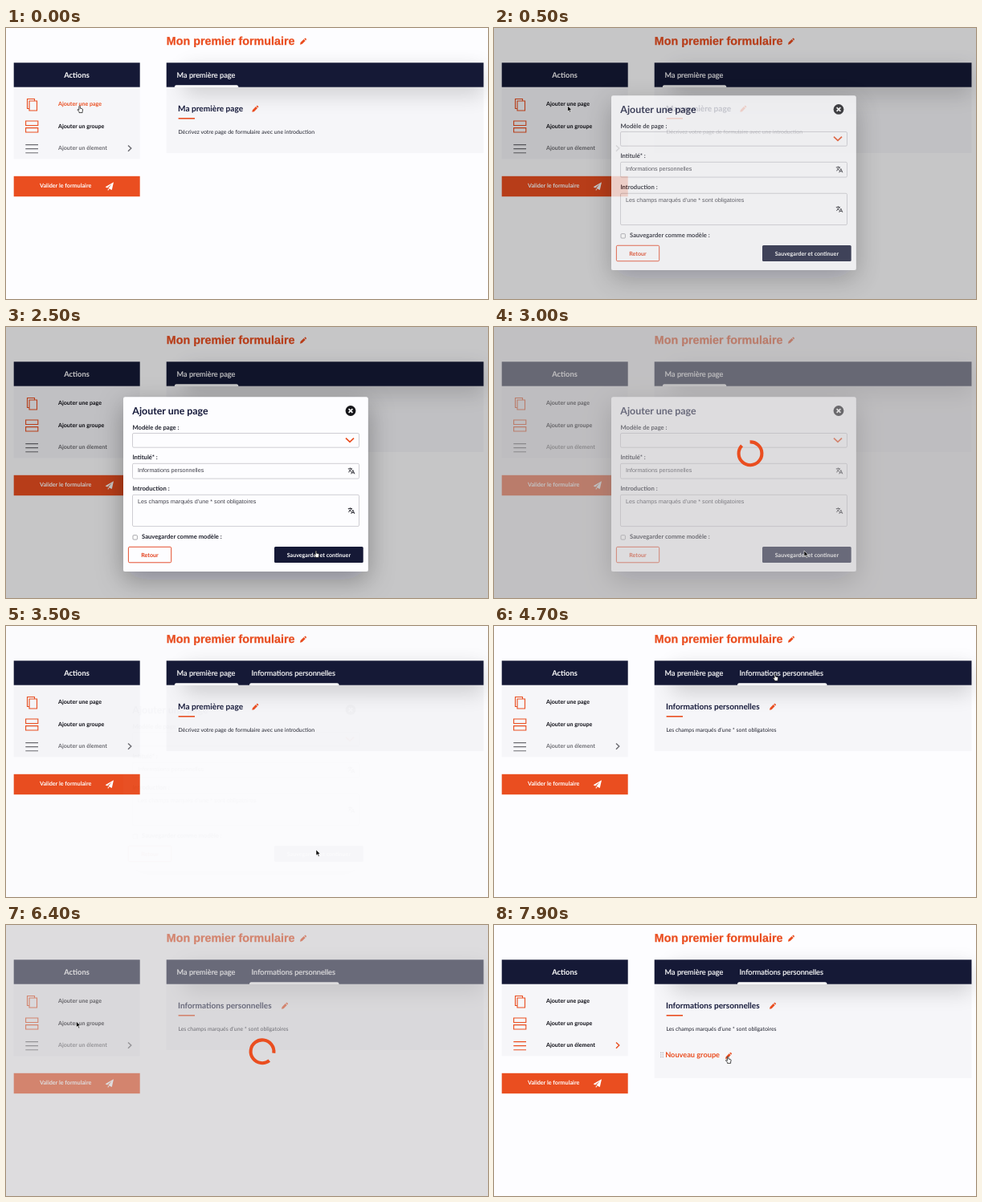
Recreate the animation shown at these times as an HTML page. Size 600x338 px, loop 8000 ms.

```html
<!DOCTYPE html>
<html lang="fr">
<head>
<meta charset="utf-8">
<title>Formulaire</title>
<style>
  html, body { margin: 0; width: 100%; height: 100%; overflow: hidden; background: #fdfdff; }
  svg { display: block; width: 600px; height: 338px; }
  text { font-family: Lato, sans-serif; fill: #15193a; white-space: pre; text-rendering: geometricPrecision; }
  .b { font-weight: 700; }
  .sans { font-family: "Liberation Sans", Arial, sans-serif; }
  .item { font-size: 7.1px; font-weight: 700; fill: #0c0c14; }
  .tab { font-size: 9.2px; fill: #fff; stroke: #fff; stroke-width: .2; }
  .label { font-size: 7.65px; font-weight: 700; fill: #20222e; }
  .input { font-size: 7.2px; fill: #40404a; }
  .box { fill: #fdfdff; stroke: #c3c2c8; stroke-width: .8; }
  .line { fill: none; stroke: #ea4e20; stroke-width: 1.1; }
  .navy { fill: #151936; }
  .orange { fill: #ea4e20; }
  .panel { fill: #f6f6f9; }
</style>
</head>
<body>
<svg viewBox="0 0 600 338" xmlns="http://www.w3.org/2000/svg">
  <defs>
    <filter id="blur" x="-30%" y="-250%" width="160%" height="600%"><feGaussianBlur stdDeviation="13"/></filter>
    <filter id="shadow" x="-30%" y="-35%" width="160%" height="180%">
      <feDropShadow dx="0" dy="10" stdDeviation="16" flood-color="#0a0820" flood-opacity=".32"/>
    </filter>
    <g id="pencil">
      <path class="orange" d="M0 8 L.6 5.4 L4.7 1.3 L6.7 3.3 L2.6 7.4 Z M5.3 .7 L6 0 Q6.6 -.3 7.1 .2 L7.8 .9 Q8.2 1.4 7.8 2 L7.2 2.7 Z"/>
    </g>
    <g id="translate" fill="none" stroke="#22222a" stroke-width=".9">
      <path d="M0 1.5 H5.2 M2.6 .2 V1.5 M4.4 1.5 Q3.6 4.2 .4 5.8 M1.2 2.6 Q2.2 4.4 3.8 5.2"/>
      <path d="M3.9 8 L6 3.2 L8.1 8 M4.7 6.5 H7.3"/>
    </g>
  </defs>

  <rect width="600" height="338" fill="#fdfdff"/>
  <text class="sans b" x="199.8" y="21" font-size="14.3" style="fill:#ea4e20;stroke:#ea4e20;stroke-width:.25">Mon premier formulaire</text>
  <use href="#pencil" x="366" y="12.7"/>

  <rect class="panel" x="9.7" y="73" width="157" height="90.4"/>
  <rect class="navy" x="9.7" y="43.3" width="157" height="30.4"/>
  <text class="b" x="88" y="62" font-size="9.4" text-anchor="middle" style="fill:#fff">Actions</text>
  <path class="line" d="M28.7 100.5 H26.5 V88.5 H35.5 V91 M29 91 H38.5 V103 H29 Z"/>
  <path class="line" d="M24.6 116 H39.8 V121.5 H24.6 Z M24.6 124.6 H39.8 V130 H24.6 Z"/>
  <path id="menuIcon" class="line" d="M24.3 145.6 H40 M24.3 150.6 H40 M24.3 155.8 H40"/>
  <path id="menuArrow" class="line" style="stroke-width:1.4" d="M152 146.4 L155.8 150.1 L152 153.8"/>
  <text id="addPage" class="item" x="65" y="97">Ajouter une page</text>
  <text id="addGroup" class="item" x="65" y="124.6">Ajouter un groupe</text>
  <text id="addItem" class="item" x="65" y="152.2">Ajouter un élement</text>
  <rect class="orange" x="9.7" y="184.8" width="157" height="25.4"/>
  <text class="b" x="42" y="199.2" font-size="7.2" style="fill:#fff">Valider le formulaire</text>
  <path fill="#fff" d="M134 192.2 L123.6 198.3 L126 199.4 L131.8 194.6 L127.3 200 L131.8 202 Z M126.8 200.5 L128.4 201.2 L126.8 203 Z"/>

  <rect id="formPanel" class="panel" x="199.7" y="73" width="394.8"/>
  <rect x="222" y="50" width="372" height="34" fill="#000" opacity=".15" filter="url(#blur)"/>
  <rect class="navy" x="199.7" y="43.3" width="394.8" height="30.4"/>
  <text class="tab" x="212.6" y="62.3">Ma première page</text>
  <path id="mark1" fill="#fff" d="M209.8 74 Q209.8 71.3 212 71.3 H287 Q289.3 71.3 289.3 74 Z"/>
  <g id="tab2">
    <text class="tab" x="305.6" y="62.3">Informations personnelles</text>
    <path fill="#fff" d="M303 74 Q303 71.3 305.2 71.3 H412.2 Q414.5 71.3 414.5 74 Z"/>
  </g>
  <text id="heading" class="b" x="214" y="104.3" font-size="10.1"></text>
  <use id="headPencil" href="#pencil" y="96.8"/>
  <rect class="orange" x="214.6" y="112" width="20.4" height="1.6"/>
  <text id="intro" x="214.4" y="132.2" font-size="6.9" style="fill:#20222e"></text>
  <g id="group">
    <g id="grip" fill="#b3b3ba"></g>
    <text class="b" x="213.2" y="165.3" font-size="9.2" style="fill:#ea4e20">Nouveau groupe</text>
    <use href="#pencil" x="288" y="159"/>
  </g>

  <rect id="backdrop" width="600" height="338"/>
  <g id="modal">
    <rect x="146" y="87.3" width="304.8" height="217.7" rx="2.5" fill="#fdfdff" filter="url(#shadow)"/>
    <text class="b" x="157.3" y="108.8" font-size="12.4">Ajouter une page</text>
    <circle cx="429" cy="104.5" r="6.4" fill="#17171b"/>
    <path d="M426.6 102.1 l4.8 4.8 m0 -4.8 l-4.8 4.8" stroke="#fff" stroke-width="1.7"/>
    <text class="label" x="157.4" y="127.6">Modèle de page :</text>
    <rect class="box" x="157.5" y="132.5" width="282" height="17.7" rx="1.5"/>
    <path class="line" style="stroke-width:1.7" d="M423 138.6 L428 143.4 L433 138.6"/>
    <text class="label" x="157.4" y="165">Intitulé* :</text>
    <rect class="box" x="157.5" y="170.3" width="282" height="18.8" rx="1.5"/>
    <text class="input sans" x="164" y="181.3">Informations personnelles</text>
    <use href="#translate" x="425.8" y="175.3"/>
    <text class="label" x="157.4" y="204.4">Introduction :</text>
    <rect class="box" x="157.5" y="209.3" width="282" height="39.3" rx="1.5"/>
    <text class="input sans" x="164" y="220.4">Les champs marqués d’une * sont obligatoires</text>
    <use href="#translate" x="425.8" y="225"/>
    <rect x="158" y="259.7" width="5.4" height="5.4" rx="1" fill="#fff" stroke="#85858c" stroke-width=".7"/>
    <text class="label" x="169" y="264.4">Sauvegarder comme modèle :</text>
    <rect x="152.4" y="274.3" width="53.3" height="19.5" rx="1.5" fill="#fdfdff" stroke="#e23c17" stroke-width=".9"/>
    <text class="b" x="179" y="286.6" font-size="7.1" text-anchor="middle" style="fill:#e23c17">Retour</text>
    <rect class="navy" x="334" y="274" width="110.7" height="20" rx="1.5"/>
    <text class="b" x="389.4" y="286.6" font-size="7.1" text-anchor="middle" style="fill:#fff">Sauvegarder et continuer</text>
  </g>

  <g id="loader">
    <rect width="600" height="338" fill="#bebcbe" opacity=".5"/>
    <circle id="ring" cx="319" cy="157.8" r="14.4" fill="none" stroke="#ea4e20" stroke-width="4.1" pathLength="360" stroke-dasharray="315 45"/>
  </g>

  <g id="cursor" stroke-linejoin="round">
    <path id="arrow" fill="#000" stroke="#fff" stroke-width=".6" d="M0 0 V7.2 L1.7 5.7 L2.9 8.6 L4.1 8.1 L2.9 5.3 H5.1 Z"/>
    <path id="hand" fill="#fff" stroke="#111" stroke-width=".75" d="M-.8 .6 Q0 -.5 .7 .6 V3.2 L3.2 3.8 Q4 4.1 3.9 5 L3.4 7.2 V8.6 H-.7 V7.6 L-2.6 5.3 Q-2.8 4.3 -1.8 4.5 L-.8 5.4 Z"/>
  </g>
</svg>
<script>
const LOOP = 8000, ORANGE = '#ea4e20', GREY = '#6c6c72', BLACK = '#0c0c14';
const PAGE_ADDED = 3220, TAB_OPENED = 4500, GROUP_ADDED = 6420;

const $ = id => document.getElementById(id);
const set = (id, attrs) => { for (const k in attrs) $(id).setAttribute(k, attrs[k]); };
const show = (id, on) => { $(id).style.display = on ? '' : 'none'; };
const ramp = (t, a, b) => Math.min(1, Math.max(0, (t - a) / (b - a)));
const smooth = p => p * p * (3 - 2 * p);
const within = (t, spans) => spans.some(([a, b]) => t >= a && t < b);
// Fades in over a..b and out over c..d.
const fade = (t, a, b, c, d) => ramp(t, a, b) * (1 - ramp(t, c, d));

// start time, end time, destination
const moves = [
  [900, 1790, 386, 279],
  [3700, 4250, 358, 58],
  [4620, 5400, 87.6, 120.3],
  [6900, 7700, 291.2, 163.8]
];
const handTimes = [[0, 300], [1720, 2800], [4180, 4720], [5220, 6100], [7600, LOOP]];

function cursorAt(t) {
  let x = 91.7, y = 97;
  for (const [a, b, toX, toY] of moves) {
    const p = smooth(ramp(t, a, b));
    x += (toX - x) * p;
    y += (toY - y) * p;
  }
  return [x, y];
}

for (let i = 0; i < 6; i++) {
  const dot = document.createElementNS('http://www.w3.org/2000/svg', 'circle');
  dot.setAttribute('cx', 207.8 + (i % 2) * 2.5);
  dot.setAttribute('cy', 159.4 + (i >> 1) * 2.6);
  dot.setAttribute('r', .8);
  $('grip').append(dot);
}

function render(t) {
  const second = t >= TAB_OPENED, grouped = t >= GROUP_ADDED;
  $('heading').textContent = second ? 'Informations personnelles' : 'Ma première page';
  $('intro').textContent = second
    ? 'Les champs marqués d’une * sont obligatoires'
    : 'Décrivez votre page de formulaire avec une introduction';
  set('headPencil', { x: second ? 343 : 306.3 });
  show('mark1', !second);
  show('tab2', t >= PAGE_ADDED);
  show('group', grouped);
  set('formPanel', { height: grouped ? 118 : 83 });

  $('addPage').style.fill = t < 300 ? ORANGE : BLACK;
  $('addGroup').style.fill = within(t, [[5220, 6100]]) ? ORANGE : BLACK;
  $('addItem').style.fill = grouped ? BLACK : GREY;
  for (const id of ['menuIcon', 'menuArrow']) $(id).style.stroke = grouped ? ORANGE : GREY;

  const modal = fade(t, 350, 550, 3250, 3505);
  const drop = 1 - ramp(t, 330, 650);
  set('backdrop', { opacity: .22 * fade(t, 250, 480, 3250, 3510) });
  set('modal', { opacity: modal, transform: `translate(0 ${-14 * drop * drop})` });
  show('modal', modal > 0);

  const loading = Math.max(fade(t, 2780, 2920, 3200, 3380), fade(t, 6080, 6220, 6400, 6580));
  set('loader', { opacity: loading });
  show('loader', loading > 0);
  set('ring', { transform: `rotate(${(t - 3000) * .36 - 92} 319 157.8)` });

  const hand = within(t, handTimes);
  show('hand', hand);
  show('arrow', !hand);
  set('cursor', { transform: `translate(${cursorAt(t)})` });
}

const start = performance.now();
function tick() {
  render((performance.now() - start) % LOOP);
  requestAnimationFrame(tick);
}
tick();
</script>
</body>
</html>
```
